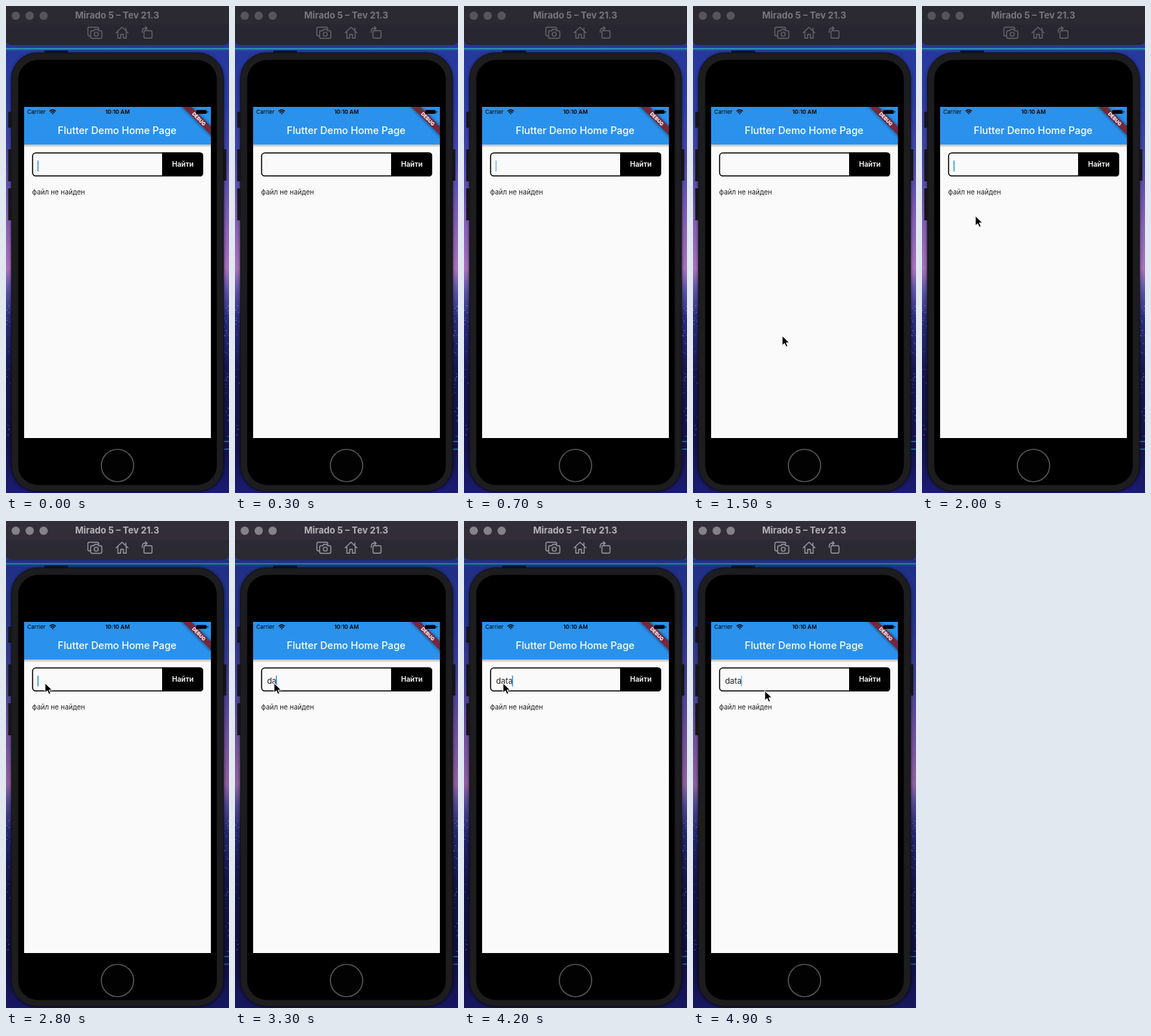
An HTML page for the animation above (5000 ms loop, 320 by 700 pixels).

```html
<!DOCTYPE html>
<html lang="ru">
<head>
<meta charset="utf-8">
<title>Simulator</title>
<style>
  html, body { margin: 0; width: 100%; height: 100%; overflow: hidden; background: #12123f; }
  svg { display: block; width: 320px; height: 700px; }
  text { font-family: Inter, Roboto, sans-serif; }
  #chrome { --bar: #2b2932; --tool: #282630; --ink: #77757d; --icon: #65636b; --light: #56545d; }
  #chrome.active { --bar: #312e39; --tool: #2b2934; --ink: #b5b3ba; --icon: #9a98a0; --light: #84828a; }
  .bar { fill: var(--bar); }
  .tool { fill: var(--tool); }
  .lights { fill: var(--light); }
  .name { fill: var(--ink); font-size: 13px; font-weight: 700; }
  .icons { fill: none; stroke: var(--icon); stroke-width: 1.4; stroke-linejoin: round; stroke-linecap: round; }
</style>
</head>
<body>
<svg viewBox="0 0 320 700">
  <defs>
    <linearGradient id="sky" x2="0" y2="1">
      <stop offset=".08" stop-color="#26379c"/>
      <stop offset=".2" stop-color="#2c3ca4"/>
      <stop offset=".32" stop-color="#4a48ac"/>
      <stop offset=".45" stop-color="#8862b8"/>
      <stop offset=".54" stop-color="#a873bd"/>
      <stop offset=".58" stop-color="#6257ad"/>
      <stop offset=".64" stop-color="#2b2d80"/>
      <stop offset=".75" stop-color="#171852"/>
      <stop offset=".9" stop-color="#14134c"/>
      <stop offset="1" stop-color="#1b1b72"/>
    </linearGradient>
    <linearGradient id="fall" x2="0" y2="1">
      <stop stop-opacity=".28"/>
      <stop offset="1" stop-opacity="0"/>
    </linearGradient>
    <clipPath id="screen"><path d="M26 145h268v476H26z"/></clipPath>
    <filter id="soft" x="-40%" y="-40%" width="180%" height="180%"><feGaussianBlur stdDeviation="2"/></filter>
  </defs>

  <rect width="320" height="700" fill="url(#sky)"/>
  <g id="city"></g>
  <path d="M0 61.5h320" stroke="#2f9cb4" stroke-width="2"/>
  <path d="M0 64.5h320" stroke="#284fa5"/>
  <path d="M55 66h34" stroke="#0e1640" stroke-width="4"/>
  <path d="M309 626h11M307 637h13" stroke="#2a7aa0" stroke-width="1.5"/>
  <rect id="shade" y="56" width="320" height="644" opacity="0"/>

  <g id="chrome">
    <path class="tool" d="M0 0h320v48q0 8-8 8H8q-8 0-8-8z"/>
    <path class="bar" d="M0 0h320v27H0z"/>
    <g class="lights">
      <circle cx="14" cy="14" r="6"/><circle cx="34" cy="14" r="6"/><circle cx="54" cy="14" r="6"/>
    </g>
    <text class="name" x="159.5" y="18" text-anchor="middle">Mirado 5 – Tev 21.3</text>
    <g class="icons">
      <path d="M121 43h-1.500q-2 0-2-2v-8.500q0-2 2-2h11.500q2 0 2 2v1"/>
      <path d="M123.500 35.500h2.500l1.500-2h4l1.500 2h2.500q2 0 2 2v7q0 2-2 2h-12q-2 0-2-2v-7q0-2 2-2z"/>
      <circle cx="129.500" cy="40.500" r="2.900"/>
      <path d="M158 38.500l8.500-8 8.500 8M160.500 37v9.300h4v-5.500h4v5.500h4V37M172 35.500v-4"/>
      <rect x="198" y="35.500" width="11.500" height="10.800" rx="1.500"/>
      <path d="M195.500 38v-2q0-4 4-4h3M200 29.500l2.500 2.500-2.500 2.500"/>
    </g>
  </g>

  <rect x="7" y="67" width="306" height="632" rx="39" opacity=".55" filter="url(#soft)"/>
  <path d="M5.500 152v23M5.500 206v46M5.500 262v46M314 206v45" stroke="#151518" stroke-width="4.500"/>
  <rect x="8" y="67.500" width="304" height="630" rx="37" fill="#1d1d1f" stroke="#111113"/>
  <rect x="17.500" y="77.500" width="285" height="611" rx="28"/>
  <circle cx="160" cy="660.500" r="23.200" fill="#020202" stroke="#555557" stroke-width="1.600"/>

  <g clip-path="url(#screen)">
    <path d="M26 145h268v476H26z" fill="#fafafa"/>
    <path d="M26 199h268v4.500H26z" fill="url(#fall)"/>
    <path d="M26 145h268v54H26z" fill="#2a92ec"/>
    <g font-size="8">
      <text x="30.500" y="155.300">Carrier</text>
      <text x="160" y="155.300" text-anchor="middle" font-weight="600">10:10 AM</text>
    </g>
    <path d="M62.500 151.300q4.500-4 9 0M64.200 153.200q2.800-2.400 5.600 0" fill="none" stroke="#000" stroke-width="1.400"/>
    <path d="M65.700 154.500q1.300-1.100 2.600 0L67 156z"/>
    <text x="159.500" y="184.300" text-anchor="middle" font-size="14.300" font-weight="500" fill="#fff">Flutter Demo Home Page</text>
    <g transform="translate(294 145) rotate(45)">
      <path d="M-34 19.500h68v10h-68z" opacity=".45" filter="url(#soft)"/>
      <path d="M-34 20h68v8.600h-68z" fill="#75273d"/>
      <text y="26.900" text-anchor="middle" font-size="7" font-weight="800" fill="#fff">DEBUG</text>
    </g>
    <rect x="273" y="149.500" width="15" height="5.500" rx="1.500"/>
    <path d="M289.500 151v2.500"  stroke="#000"/>
    <rect x="38.200" y="211.200" width="244" height="33" rx="4.500" fill="#fafafa" stroke="#000" stroke-width="1.500"/>
    <path d="M224 210.500h54q5 0 5 5v24.500q0 5-5 5h-54z"/>
    <text x="253.700" y="231.300" text-anchor="middle" font-size="10.200" font-weight="600" fill="#fff">Найти</text>
    <text x="37.500" y="271.300" font-size="9.900" fill="#222">файл не найден</text>
    <text id="query" x="46" y="234" font-size="11.600" fill="#222"></text>
    <rect id="caret" y="222" width="1.500" height="16" rx=".7" fill="#2a92ec"/>
  </g>

  <path id="pointer" d="M0 0v14l3.300-3 2.200 5 2.500-1.100-2.200-4.900h4.600z" stroke="#fff" stroke-width="1" stroke-linejoin="round"/>
</svg>

<script>
const LOOP = 5000, STEP = 100;
const $ = id => document.getElementById(id);
const query = $('query'), caret = $('caret'), pointer = $('pointer');

// [time, x, y] of the pointer tip
const path = [
  [1000, 215, 702], [1500, 128, 474], [2200, 56, 233], [4200, 56, 233],
  [4500, 75, 243], [4600, 76.5, 243.5], [4800, 76.5, 243.5], [4900, 103, 244]
];
// [time, text, caret x]
const typing = [
  [0, '', 45.2], [3000, 'd', 52.5], [3200, 'da', 58.7], [3700, 'dat', 62.8], [3800, 'data', 68.8]
];

const clamp = v => Math.min(1, Math.max(0, v));

function pointerAt(t) {
  const next = path.findIndex(p => p[0] > t);
  if (next === 0) return null;
  if (next < 0) return path[path.length - 1].slice(1);
  const a = path[next - 1], b = path[next];
  const k = (t - a[0]) / (b[0] - a[0]);
  return [a[1] + (b[1] - a[1]) * k, a[2] + (b[2] - a[2]) * k];
}

function caretAlpha(t) {
  if (t >= 4900) return .6;
  if (t >= 2600) return 1;
  const phase = (t + 400) % 1000;
  const fade = p => 1 - (1 - clamp(p / 250)) ** 2;
  return phase < 500 ? fade(phase) : 1 - fade(phase - 500);
}

function drawCity() {
  let seed = 7;
  const random = () => (seed = seed * 16807 % 2147483647) / 2147483647;
  let lights = '';
  for (let i = 0; i < 70; i++) {
    const x = (random() < .5 ? 0 : 312) + random() * 7;
    const y = 430 + random() ** 1.5 * 190;
    lights += `<rect x="${x}" y="${y}" width="1.5" height="1" fill="#aab0ff" opacity="${.15 + random() * .5}"/>`;
  }
  $('city').innerHTML = lights;
}

function render(now) {
  const t = Math.floor(now % LOOP / STEP) * STEP;
  const [, text, caretX] = typing.filter(s => s[0] <= t).pop();
  if (query.textContent !== text) query.textContent = text;
  caret.setAttribute('x', caretX);
  caret.setAttribute('opacity', caretAlpha(t));

  const tip = pointerAt(t);
  pointer.setAttribute('visibility', tip ? 'visible' : 'hidden');
  if (tip) pointer.setAttribute('transform', `translate(${tip})`);

  const active = t >= 2200;
  $('chrome').classList.toggle('active', active);
  $('shade').setAttribute('opacity', active ? .15 : 0);
}

drawCity();
render(0);
const start = performance.now();
(function tick() {
  render(performance.now() - start);
  requestAnimationFrame(tick);
})();
</script>
</body>
</html>
```
